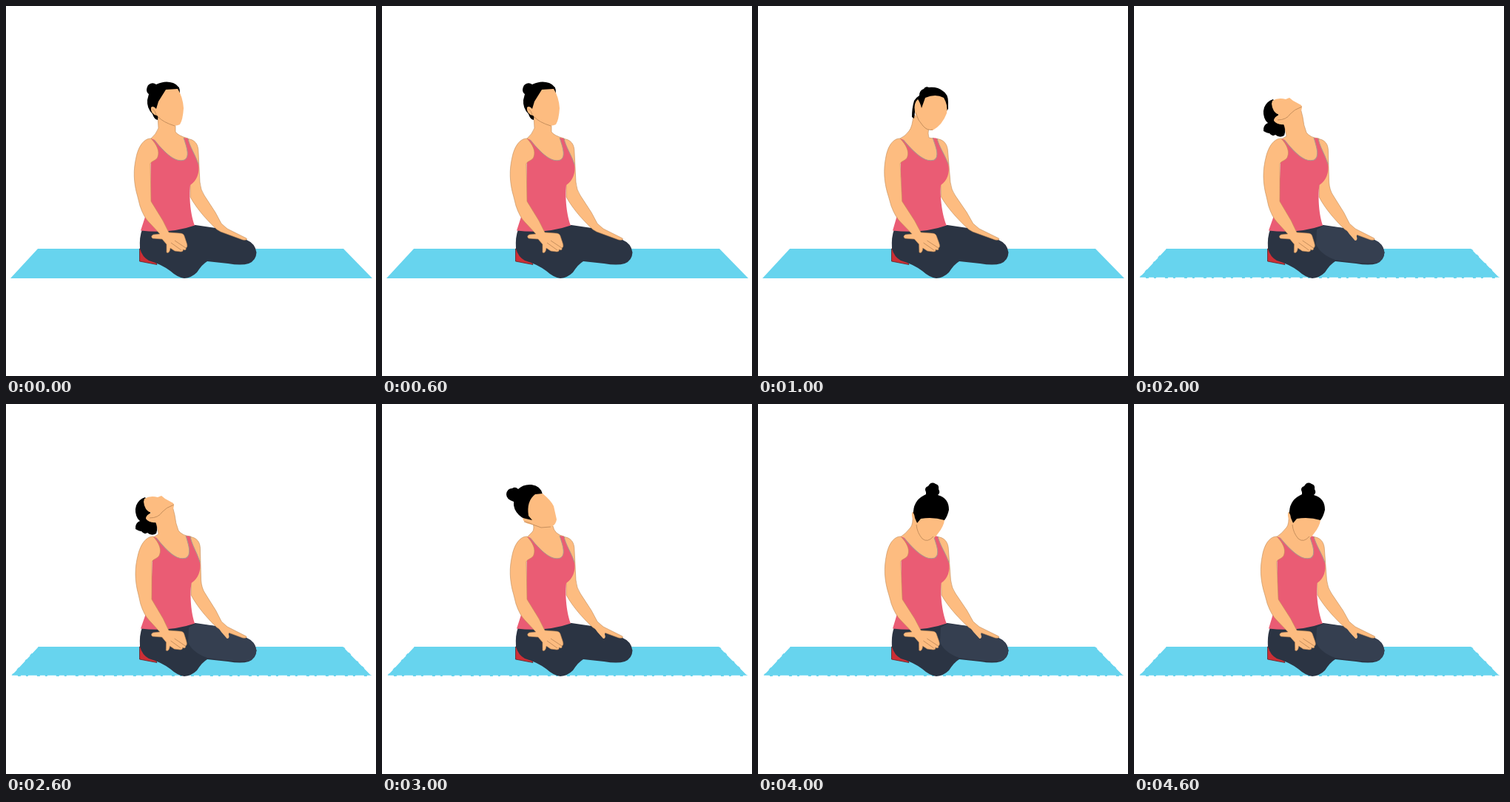
These frames come from a looping animation (500x500 px, 5 s). An HTML page:

```html
<!DOCTYPE html>
<html lang="en">
<head>
<meta charset="utf-8">
<title>Seated neck stretch</title>
<style>
  html, body { margin: 0; width: 100%; height: 100%; overflow: hidden; background: #fff; }
  svg { display: block; width: 100vw; height: 100vh; }
  .skin { fill: #fdbc80; }
  .edge { stroke: #c08a58; stroke-width: .6; }
  .line { fill: none; stroke: #b98455; stroke-width: .8; }
  .pink { fill: #ea5c74; }
  .seam { fill: none; stroke: #a9988c; stroke-width: 1; }
  .dark { fill: #2b3443; }
</style>
</head>
<body>
<svg viewBox="0 0 500 500">
  <path fill="#67d4ee" d="M43 328H456L495 368H6Z"/>
  <path id="fray" d="M43 328L6 367.500H495L456 328" fill="none" stroke="#fff" stroke-width="1.400" stroke-dasharray="12 4 7 3"/>
  <path d="M180.500 328V345L204 349.500L196 330Z" fill="#cc2f36" stroke="#5b2529" stroke-width=".8"/>

  <path class="dark" d="M184 302Q180 312 181 328Q184 339 193 344Q210 349 222 358Q232 367 241 368Q251 367 258 360Q265 349 272 345L300 348Q318 351 328 348Q338 344 338.500 333Q337 321 325 316L290 301L256 296Z"/>
  <path id="thigh" fill="#353f50" d="M247 302L256 297L290 301L325 316Q337 321 338.500 333Q337 343 329 347Q310 349 272 343Q252 336 246 322Z"/>

  <g id="body">
    <path class="skin edge" d="M243 179C256 180 260 187 260 198L262 238Q263 249 268 256L283 279L291 294L299 301L325 314Q327 317 320 316L290 305L285 302C275 293 258 275 249 258V240L256 215Z"/>
    <path id="thumb" class="skin" d="M286 301L291 308L299 317Q303 317 301 311L303 304Z"/>
  </g>
  <path id="neck" class="skin edge"/>
  <g id="top">
    <path class="skin" d="M199 181L222 210L248 209L242 181Z"/>
    <path class="pink" d="M196 179L195 263L188 285L182 303.500Q222 308 255 296.500C250 284 247 260 249 242C258 236 262 225 260 214C256 201 248 190 246 179L240 178C244 190 249 204 241 208C229 212 216 200 201 181Z"/>
    <path class="seam" d="M200 181C216 200 229 212 241 208C249 204 244 190 240 178M246 179C248 190 256 201 260 214"/>
    <path class="skin edge" d="M196 179C186 179 179 190 176 204C172 221 172 238 178 258L181 270Q186 285 193 292L208 308L199 309Q195 311 198 314L211 315L217 322L217 333Q221 335 222 327L228 331L236 332Q240 332 239 329Q244 331 243 327Q246 326 244 320L241 311Q240 307 234 307L220 306L212 290L196 264L195 213C197 209 203 209 205 204C208 196 204 188 196 179Z"/>
    <path class="line" d="M223 320L237 330M228 317L243 327"/>
  </g>
  <path id="hair"/>
  <path id="face" class="skin"/>
  <path id="jaw" class="line"/>
</svg>
<script>
const STEP = 1000;
const $ = id => document.getElementById(id);

// lean: sideways shift of the shoulders; worn: frayed mat edge and visible thumb
const poses = [
  {
    lean: 0, worn: false, shade: false,
    neck: "M205 148L206 165Q203 173 196 179L220 208L241 209L246 179Q232 175 229 170V158Z",
    hair: "M190 113Q191 106 195 105Q199 103 203 106Q215 100 226 104Q236 108 235 118L226 114L206 140L205 154Q200 153 198 146Q190 138 191 127L193 119Q190 117 190 113Z",
    face: "M216 113L232 112Q239 123 240 138Q239 154 235 160Q229 163 222 160Q210 156 206 150L204 148Q195 146 196 137Q199 134 203 139L206 129Z",
    jaw: "M206 150Q212 157 228 162M198 139Q202 142 203 147"
  },
  {
    lean: -4, worn: false, shade: false,
    neck: "M210 146Q209 163 204 169Q199 176 192 179L216 208L238 209L242 180L231 178Q229 173 231 164Z",
    hair: "M208 150Q208 138 211 128Q213 124 218 121Q218 114 224 112Q226 108 231 110Q243 109 250 115Q257 119 257 130V139L254 143L222 139L213 134L211 152Z",
    face: "M226 124Q240 118 251 124Q257 134 255 145Q249 161 236 168Q229 168 221 160Q214 152 212 143Q210 131 216 126Q219 130 221 138Z",
    jaw: "M213 144Q216 155 223 162Q229 169 236 167"
  },
  {
    lean: 3, worn: true, shade: true,
    neck: "M200 154Q206 172 206 176L199 180L225 208L245 209L250 179Q238 178 233 171Q229 161 228 150L225 138Z",
    hair: "M188 126Q179 129 176 137Q173 146 178 155L181 158Q174 161 175 169Q180 172 183 172Q187 177 191 174Q197 179 203 175Q206 166 201 158L194 157L196 140Z",
    face: "M187 128Q195 123 205 126L210 124L215 128L226 134Q229 138 223 146L203 160Q193 161 189 155Q189 150 196 147Q187 144 186 132Z",
    jaw: "M227 136Q216 140 211 146Q206 154 194 154"
  },
  {
    lean: 0, worn: true, shade: false,
    neck: "M203 157Q207 169 203 173L196 180L220 208L241 209L246 179Q233 176 231 165Z",
    hair: "M168 122Q169 114 176 114Q180 111 184 115Q191 108 202 109Q215 111 217 122L206 130L204 158Q192 157 185 150Q177 142 178 132Q168 129 168 122Z",
    face: "M207 122L217 121Q229 131 232 138L236 156Q235 163 229 166L215 167Q205 163 198 162Q191 160 190 154L203 157L198 151Q195 131 207 122Z",
    jaw: "M192 159Q199 160 204 163L215 167L228 166"
  },
  {
    lean: -3, worn: true, shade: true,
    neck: "M209 146Q210 163 206 167Q199 176 192 180L216 208L238 209L243 180L238 178V166Z",
    hair: "M227 119Q224 113 230 111Q234 104 240 108Q245 109 244 115Q247 120 243 123Q258 127 258 143Q256 152 252 157L215 161Q209 155 210 145Q211 129 227 122Z",
    face: "M220 155Q236 152 252 157Q251 165 244 174Q238 183 230 185Q222 184 217 176Q213 169 213 161Q207 155 208 147Q211 146 212 154L215 161Z",
    jaw: "M214 163Q215 174 222 182Q229 188 237 179"
  }
];

let shown = -1;
function frame(now) {
  const i = Math.floor(now / STEP) % poses.length;
  if (i !== shown) {
    shown = i;
    const pose = poses[i], k = -pose.lean / 125;
    for (const id of ["neck", "hair", "face", "jaw"]) $(id).setAttribute("d", pose[id]);
    // Lean the upper body about the waist at y = 303
    for (const id of ["body", "top"])
      $(id).setAttribute("transform", `matrix(1 0 ${k} 1 ${-303 * k} 0)`);
    const show = (id, on) => $(id).style.display = on ? "" : "none";
    show("fray", pose.worn);
    show("thumb", pose.worn);
    show("thigh", pose.shade);
  }
  requestAnimationFrame(frame);
}
frame(performance.now());
</script>
</body>
</html>
```
